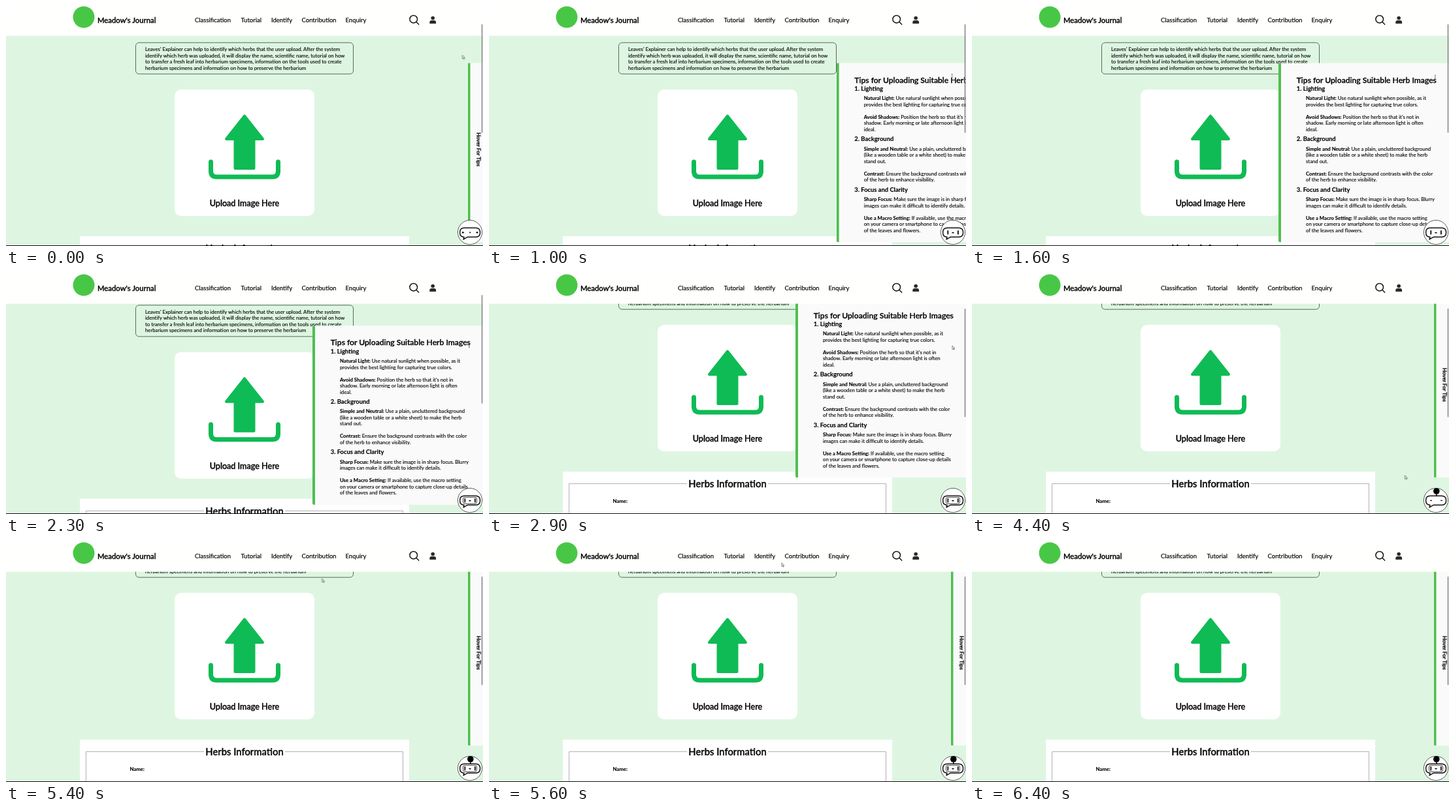
These frames come from a looping animation (730x368 px, 6500 ms). An HTML page:

```html
<!DOCTYPE html>
<html lang="en">
<head>
<meta charset="utf-8">
<title>Herb identification page</title>
<style>
html, body { margin: 0; width: 100%; height: 100%; overflow: hidden; background: #def6e1; }
svg { display: block; width: 730px; height: 368px; }
text {
  font-family: Lato, "Open Sans", sans-serif; font-size: 7.75px;
  fill: #000; stroke: #000; stroke-width: .12px; white-space: pre;
}
.medium { font-weight: 500; stroke-width: .36px; }
.bold { font-weight: 700; }
.middle { text-anchor: middle; }
.nav text { font-size: 9.5px; stroke-width: .18px; }

/* The clock script below sets the time of these paused animations. */
.page, .bar, .panel, .label, .cursor, .arrow, .beam, .ball, .dots, .eyes, .blink, .face {
  animation: 6500ms linear infinite paused;
}
.page { animation-name: scroll; }
.bar { animation-name: bar; }
.panel { animation-name: slide; }
.cursor { animation-name: roam; }
.ball { animation-name: ball; }
.label, .arrow, .beam, .dots, .eyes, .blink, .face { animation-timing-function: step-end; }
.label { animation-name: label; }
.arrow { animation-name: arrow; }
.beam { animation-name: beam; }
.dots { animation-name: dots; }
.eyes { animation-name: eyes; }
.blink { animation-name: blink; }
.face { animation-name: face; }

@keyframes scroll {
  0%, 34.25% { transform: translateY(0); animation-timing-function: ease-in-out; }
  38.25%, 100% { transform: translateY(-50px); }
}
@keyframes bar {
  0%, 34.25% { transform: translateY(0); animation-timing-function: ease-in-out; }
  38.25%, 100% { transform: translateY(25px); }
}
@keyframes slide {
  0%, 13.35% { transform: translateX(706.5px); animation-timing-function: ease; }
  17.97%, 62.88% { transform: translateX(469px); animation-timing-function: ease; }
  67.49%, 100% { transform: translateX(706.5px); }
}
@keyframes label {
  0% { opacity: 1; } 13.35% { opacity: 0; } 62.88%, 100% { opacity: 1; }
}
@keyframes roam {
  0% { transform: translate(698.5px, 75.5px); }
  12.3% { transform: translate(707px, 92px); }
  15.38% { transform: translate(708.5px, 107px); }
  33.8%, 55.4% { transform: translate(709px, 110px); }
  63.08% { transform: translate(671px, 320px); }
  75.4% { transform: translate(648px, 290px); }
  83.08% { transform: translate(483.5px, 56px); }
  87.7% { transform: translate(430px, 20px); }
  90.8%, 100% { transform: translate(414px, -20px); }
}
@keyframes arrow {
  0% { opacity: 1; } 14.6% { opacity: 0; } 37.7%, 100% { opacity: 1; }
}
@keyframes beam {
  0% { opacity: 0; } 14.6% { opacity: 1; } 37.7%, 100% { opacity: 0; }
}
@keyframes ball {
  0%, 54% { transform: translateY(10px); opacity: 0; }
  55.4% { opacity: 1; }
  58.5%, 100% { transform: translateY(0); opacity: 1; }
}
@keyframes dots { 0% { opacity: 1; } 9%, 100% { opacity: 0; } }
@keyframes eyes {
  0% { opacity: 0; } 9% { opacity: 1; } 61.5% { opacity: 0; } 68%, 100% { opacity: 1; }
}
@keyframes blink { 0% { opacity: 0; } 61.5% { opacity: 1; } 68%, 100% { opacity: 0; } }
@keyframes face {
  0% { opacity: 0; } 30% { opacity: 1; } 61.5% { opacity: 0; } 68%, 100% { opacity: 1; }
}
</style>
</head>
<body>
<svg viewBox="0 0 730 368">
  <rect width="730" height="368" fill="#def6e1"/>

  <g class="page">
    <rect x="198.5" y="56.2" width="333" height="48" rx="5" fill="none" stroke="#4b5a4e" stroke-width=".9"/>
    <g id="intro"></g>

    <rect x="258" y="128" width="214" height="194" rx="10" fill="#fff"/>
    <g fill="#0fbb55" stroke="#0fbb55" stroke-linejoin="round">
      <path d="M365 168.6L393 204H379.5V249H350.5V204H337Z" stroke-width="4"/>
      <path d="M313.5 239V253Q313.5 262 322.5 262H407.5Q416.5 262 416.5 253V239" fill="none" stroke-width="7" stroke-linecap="round"/>
    </g>
    <text class="medium middle" x="365" y="307.3" style="font-size:12.6px">Upload Image Here</text>

    <rect x="113" y="353" width="504" height="100" fill="#fff"/>
    <path d="M303 371.5H122.5V440M427 371.5H607.5V440" fill="none" stroke="#a9a9a9" stroke-width=".9"/>
    <text class="medium middle" x="365" y="377.2" style="font-size:14.8px">Herbs Information</text>
    <text class="bold" x="189.5" y="400.5">Name:</text>

    <g class="panel">
      <rect y="87.5" width="290" height="274.5" rx="2" fill="#fafafa"/>
      <path d="M4 87.5H2Q0 87.5 0 89.5V360Q0 362 2 362H4Z" fill="#4fbf50"/>
      <g id="tips">
        <text class="medium" x="27.7" y="117.8" style="font-size:12.15px">Tips for Uploading Suitable Herb Images</text>
      </g>
      <text class="label medium middle" transform="translate(14 220) rotate(90)" style="font-size:8.1px">Hover For Tips</text>
    </g>
  </g>

  <rect width="730" height="45.6" fill="#fffffe"/>
  <circle cx="119" cy="17" r="16.5" fill="#48c746"/>
  <text class="medium" x="140" y="26" style="font-size:11.3px">Meadow's Journal</text>
  <g class="nav">
    <text x="289" y="24.8">Classification</text>
    <text x="359.5" y="24.8">Tutorial</text>
    <text x="406" y="24.8">Identify</text>
    <text x="452.5" y="24.8">Contribution</text>
    <text x="519.5" y="24.8">Enquiry</text>
  </g>
  <g fill="none" stroke="#161616" stroke-width="1.5" stroke-linecap="round">
    <circle cx="623.7" cy="20.2" r="5.8"/>
    <path d="M628 24.5L631.7 28.2"/>
  </g>
  <g fill="#2c2c2c">
    <circle cx="653.2" cy="18.5" r="2.8"/>
    <path d="M648.3 27V25Q648.3 22 651.3 22H655.1Q658.1 22 658.1 25V27Z"/>
  </g>

  <rect class="bar" x="727.7" y="28" width="1.6" height="166.5" rx=".8" fill="#8c8c8c"/>
  <rect y="367" width="730" height="1" fill="#111"/>

  <g fill="none" stroke="#111">
    <circle cx="710" cy="347" r="18.6" fill="#fff" stroke="#333" stroke-width=".8"/>
    <g class="ball">
      <circle cx="710.8" cy="333" r="4.8" fill="#000" stroke="none"/>
      <path d="M710.8 336V341" stroke-width="1.6"/>
    </g>
    <path d="M701 340.3H719Q725.6 340.3 725.6 347.3T719 354.3H706L700 357.8L701 354.3Q694.6 354.3 694.6 347.3T701 340.3Z" fill="#fff" stroke-width="1.5" stroke-linejoin="round"/>
    <rect class="face" x="699.5" y="342.4" width="21" height="9.8" rx="2.5" stroke-width=".8"/>
    <g class="dots" fill="#111" stroke="none">
      <circle cx="699.3" cy="347.3" r="1.4"/><circle cx="710.2" cy="347.3" r="1.1"/><circle cx="721" cy="347.3" r="1.4"/>
    </g>
    <path class="eyes" d="M702.3 345V349.6M717.9 345V349.6M709.2 347.6H710.8" stroke-width="1.9" stroke-linecap="round"/>
    <path class="blink" d="M701 347.4H704M717 347.4H720" stroke-width="1.3"/>
  </g>

  <g class="cursor">
    <path class="arrow" d="M0 0V5.4L1.3 4.3L2.2 6.2L3.1 5.8L2.3 3.9H3.9Z" fill="#fff" stroke="#333" stroke-width=".6"/>
    <path class="beam" d="M-.8 -2.6H.8M0 -2.6V2.6M-.8 2.6H.8" fill="none" stroke="#444" stroke-width=".7"/>
  </g>
</svg>
<script>
const LOOP = 6500, STEP = 100, LINE = 9.5;

function addText(parent, x, y, text, lead = '', style = '') {
  const make = name => document.createElementNS('http://www.w3.org/2000/svg', name);
  const node = make('text');
  node.setAttribute('x', x);
  node.setAttribute('y', y);
  node.setAttribute('style', style);
  if (lead) {
    const strong = make('tspan');
    strong.setAttribute('class', 'bold');
    strong.textContent = lead;
    node.append(strong);
  }
  node.append(text);
  parent.append(node);
}

const intro = document.getElementById('intro');
[
  "Leaves' Explainer can help to identify which herbs that the user upload. After the system",
  'identify which herb was uploaded, it will display the name, scientific name, tutorial on how',
  'to transfer a fresh leaf into herbarium specimens, information on the tools used to create',
  'herbarium specimens and information on how to preserve the herbarium'
].forEach((line, i) => addText(intro, 213, 69.2 + i * LINE, line));

const tips = document.getElementById('tips');
[[129.9, '1. Lighting'], [207.2, '2. Background'], [284.5, '3. Focus and Clarity']]
  .forEach(([y, title]) => addText(tips, 27.7, y, '', title, 'font-size:9.4px'));
[
  [144.4, 'Natural Light:', ['Use natural sunlight when possible, as it', 'provides the best lighting for capturing true colors.']],
  [172.9, 'Avoid Shadows:', ["Position the herb so that it's not in", 'shadow. Early morning or late afternoon light is often', 'ideal.']],
  [221.8, 'Simple and Neutral:', ['Use a plain, uncluttered background', '(like a wooden table or a white sheet) to make the herb', 'stand out.']],
  [259.8, 'Contrast:', ['Ensure the background contrasts with the color', 'of the herb to enhance visibility.']],
  [299.1, 'Sharp Focus:', ['Make sure the image is in sharp focus. Blurry', 'images can make it difficult to identify details.']],
  [327.6, 'Use a Macro Setting:', ['If available, use the macro setting', 'on your camera or smartphone to capture close-up details', 'of the leaves and flowers.']]
].forEach(([y, lead, lines]) => lines.forEach((line, i) =>
  addText(tips, 42, y + i * LINE, i ? line : ' ' + line, i ? '' : lead)));

// The picture advances ten times a second.
const motions = document.getAnimations();
const start = performance.now();
function tick() {
  const elapsed = (performance.now() - start) % LOOP;
  const time = Math.floor(elapsed / STEP) * STEP;
  for (const motion of motions) motion.currentTime = time;
  requestAnimationFrame(tick);
}
tick();
</script>
</body>
</html>
```
